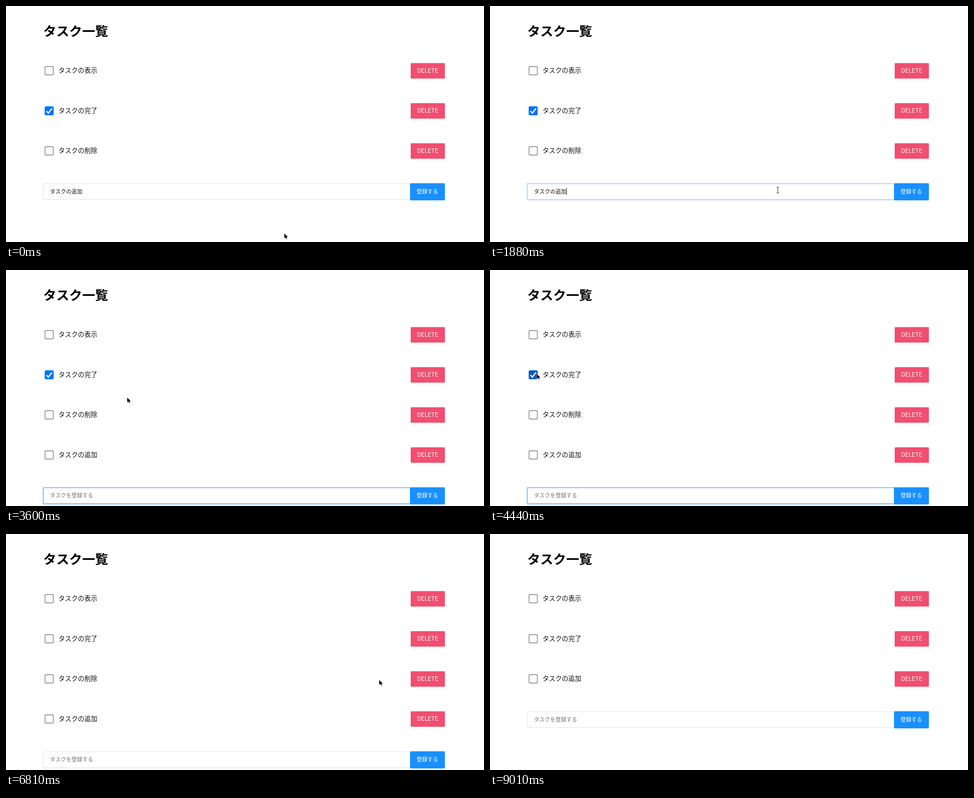
These frames come from a looping animation (1063 by 527 pixels, 9660 ms). An HTML page:

```html
<!DOCTYPE html>
<html lang="ja">
<head>
<meta charset="utf-8">
<title>タスク一覧</title>
<style>
html, body { margin: 0; width: 100%; height: 100%; overflow: hidden; background: #fff; }
svg { display: block; font-family: "Noto Sans CJK JP", "Noto Sans CJK", sans-serif; font-weight: 350; }
</style>
</head>
<body>
<svg id="stage" width="1063" height="527" viewBox="0 0 1063 527"></svg>
<script>
const LOOP = 9660, PITCH = 89.5;
const ADD = 2300, FOCUS = 1770, UNCHECK = 4620, REMOVE = 8100;

// Pointer moves: start, end, target x, target y
const START = [619, 508];
const MOVES = [
  [50, 550, 629, 471],
  [1140, 1170, 638, 437],
  [1170, 1410, 640, 411],
  [2800, 3340, 342, 323],
  [3480, 3670, 243, 271],
  [3840, 4430, 104, 232],
  [5250, 5530, 265, 256],
  [5530, 5780, 375, 285],
  [6100, 6360, 733, 327],
  [6570, 6810, 830, 326],
  [7050, 7380, 903, 322],
  [7380, 7630, 901, 313],
  [7830, 7850, 903, 320],
  [8040, 8060, 903, 325],
  [8360, 9010, 637, 528]
];

const stage = document.getElementById('stage');

function el(parent, tag, attrs, text) {
  const node = document.createElementNS('http://www.w3.org/2000/svg', tag);
  set(node, attrs);
  if (text) node.textContent = text;
  parent.appendChild(node);
  return node;
}
function set(node, attrs) {
  for (const k in attrs) node.setAttribute(k, attrs[k]);
}
function box(parent, x, y, width, height, rx, attrs) {
  return el(parent, 'rect', { x, y, width, height, rx, ...attrs });
}
function show(node, on) {
  node.style.display = on ? '' : 'none';
}
function ramp(t, a, b) {
  return Math.min(1, Math.max(0, (t - a) / (b - a)));
}

el(stage, 'text', { x: 83, y: 67, 'font-size': 28.8, 'font-weight': 700 }, 'タスク一覧');

const rows = ['表示', '完了', '削除', '追加'].map((name, i) => {
  const g = el(stage, 'g', { transform: `translate(0 ${i * PITCH})` });
  const check = box(g, 86.7, 135.2, 18.6, 18.6, 2.2, { 'stroke-width': 1.4 });
  const mark = el(g, 'path', {
    d: 'M90 145.3L94.2 149.6L102.2 139.2', fill: 'none', stroke: '#fff', 'stroke-width': 2.7
  });
  const label = el(g, 'text', { x: 116.7, y: 149.2, 'font-size': 14.4, fill: '#111' }, 'タスクの' + name);
  const del = el(g, 'g', {});
  box(del, 900, 127.5, 76, 34.5, 1.5, { fill: '#f14e70' });
  el(del, 'text', {
    x: 937.8, y: 148.8, 'font-size': 12.6, 'font-weight': 400, fill: '#fff',
    'text-anchor': 'middle', 'font-family': 'Inter, sans-serif'
  }, 'DELETE');
  return { g, check, mark, label, del };
});

const form = el(stage, 'g', {});
box(form, 83, 396.8, 816, 35.7, 1, { fill: '#fff', stroke: '#e6e6e6', 'stroke-width': 1.3 });
const glow = el(form, 'g', {});
box(glow, 82, 395.7, 818, 37.9, 1.5, { fill: 'none', stroke: '#1890ff', 'stroke-opacity': .2, 'stroke-width': 2 });
box(glow, 83, 396.8, 816, 35.7, 1, { fill: 'none', stroke: '#5cb5ff', 'stroke-width': 1.3 });
const field = el(form, 'text', { x: 97.7, y: 418.6, 'font-size': 12 });
const caret = box(form, 98, 406, 1, 16, 0, { fill: '#222' });
box(form, 898.5, 395.7, 77.5, 38.3, 2, { fill: '#1890ff' });
el(form, 'text', { x: 913, y: 418.9, 'font-size': 12, fill: '#fff' }, '登録する');

const pointer = el(stage, 'g', {});
const arrow = el(pointer, 'path', {
  d: 'M0 0V10.8L2.6 8.5L4.3 12.3L6.1 11.5L4.5 7.9H7.9Z',
  fill: '#000', stroke: '#fff', 'stroke-width': 1, 'paint-order': 'stroke'
});
const beam = el(pointer, 'path', {
  d: 'M-2.5 -6.5H-.7L0 -6L.7 -6.5H2.5M0 -6V6M-2.5 6.5H-.7L0 6L.7 6.5H2.5',
  fill: 'none', stroke: '#111', 'stroke-width': 1
});
const hand = el(pointer, 'path', {
  d: 'M-1 1Q0 -.5 1 1V5L6 6.2Q7 6.6 6.8 8L6 11.5V14H-1V12L-4 8.5Q-4 7 -2.7 7.5L-1 9Z',
  fill: '#fff', stroke: '#000', 'stroke-width': .9, 'stroke-linejoin': 'round'
});

function pointerAt(t) {
  let [x, y] = START;
  for (const [a, b, tx, ty] of MOVES) {
    if (t < a) break;
    const u = 1 - Math.pow(1 - ramp(t, a, b), 1.3);
    x += (tx - x) * u;
    y += (ty - y) * u;
  }
  return [x, y];
}

function draw(t) {
  const added = t >= ADD, removed = t >= REMOVE;
  const shift = added && !removed ? PITCH : 0;
  const [x, y] = pointerAt(t);

  rows.forEach((row, i) => {
    const top = 134.5 + i * PITCH;
    const hover = x >= 86 && x <= 106 && y >= top && y <= top + 20;
    const on = i === 1 && t < UNCHECK;
    const blue = hover ? '#005cc8' : '#0075ff';
    set(row.check, { fill: on ? blue : '#fff', stroke: on ? blue : hover ? '#4f4f4f' : '#767676' });
    show(row.mark, on);
  });
  show(rows[3].g, shift > 0);
  rows[2].label.textContent = removed ? 'タスクの追加' : 'タスクの削除';
  rows[2].del.setAttribute('opacity', removed ? 1 : 1 - .2 * ramp(t, 7330, 7630));

  form.setAttribute('transform', `translate(0 ${shift})`);
  field.textContent = added ? 'タスクを登録する' : 'タスクの追加';
  field.setAttribute('fill', added ? '#757575' : '#111');
  glow.setAttribute('opacity', ramp(t, FOCUS - 30, 2000) - ramp(t, UNCHECK - 30, 4850));
  caret.setAttribute('x', added ? 98 : 170);
  show(caret, t >= FOCUS && t < UNCHECK && Math.floor((t - FOCUS + 10) / 530) % 2 === 0);

  const inField = x > 82 && x < 898 && y > 396 + shift && y < 433 + shift;
  const onDelete = x >= 900 && t < 8060;
  pointer.setAttribute('transform', `translate(${x.toFixed(2)} ${y.toFixed(2)})`);
  show(beam, inField);
  show(hand, onDelete);
  show(arrow, !inField && !onDelete);
}

const began = performance.now();
function tick() {
  draw((performance.now() - began) % LOOP);
  requestAnimationFrame(tick);
}
tick();
</script>
</body>
</html>
```
